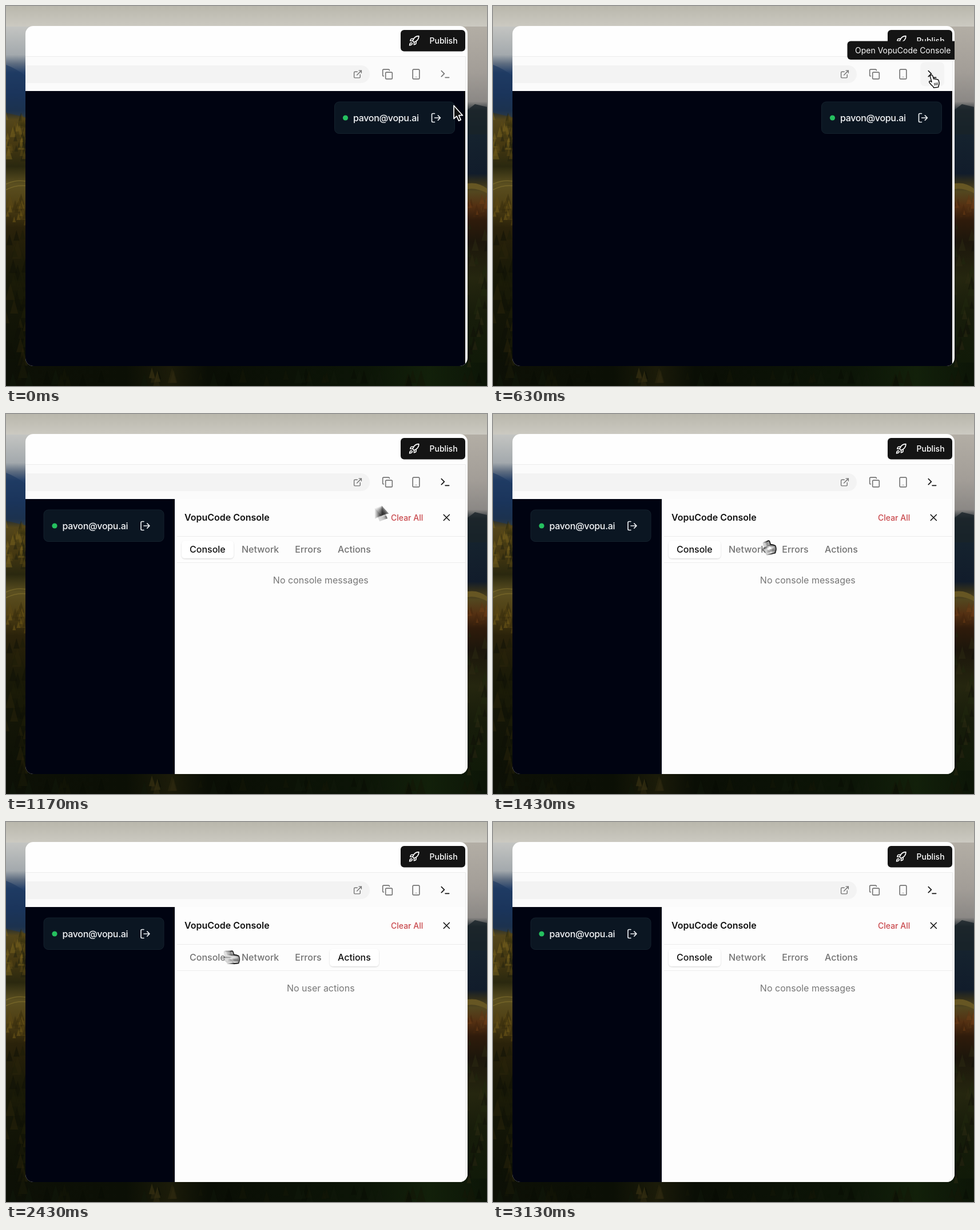
These frames come from a looping animation (841 by 666 pixels, 3160 ms). An HTML page:

```html
<!DOCTYPE html>
<html lang="en">
<head>
<meta charset="utf-8">
<title>Console panel</title>
<style>
  html, body { margin: 0; width: 100%; height: 100%; overflow: hidden; background: #0b1006; }
  svg { display: block; }
  text { font-family: Inter, "Liberation Sans", sans-serif; font-size: 16px; }
  .small { font-size: 14px; }
  .medium { font-weight: 500; }
  .bold { font-weight: 600; }
  .email { font-weight: 500; letter-spacing: -.02em; }
  .icon { fill: none; stroke: currentColor; stroke-width: 2; stroke-linecap: round; stroke-linejoin: round; }
  .line { fill: none; stroke: #ececec; stroke-width: 1; }
</style>
</head>
<body>
<svg width="841" height="666" viewBox="0 0 841 666">
  <defs>
    <linearGradient id="sky" x1="0" x2="0" y1="0" y2="1">
      <stop offset="0" stop-color="#b9b7ac"/><stop offset="1" stop-color="#cbc9c1"/>
    </linearGradient>
    <linearGradient id="leftLand" gradientUnits="userSpaceOnUse" x1="0" x2="0" y1="35" y2="666">
      <stop offset="0" stop-color="#c4c5c2"/><stop offset=".08" stop-color="#a3a9ad"/>
      <stop offset=".105" stop-color="#5d6c80"/><stop offset=".13" stop-color="#25416a"/>
      <stop offset=".19" stop-color="#1a3055"/><stop offset=".235" stop-color="#1d2a36"/>
      <stop offset=".26" stop-color="#54461a"/><stop offset=".33" stop-color="#453811"/>
      <stop offset=".39" stop-color="#2a280f"/><stop offset=".44" stop-color="#5b4f20"/>
      <stop offset=".5" stop-color="#4d3e13"/><stop offset=".56" stop-color="#2a220a"/>
      <stop offset=".7" stop-color="#171807"/><stop offset="1" stop-color="#0a0e05"/>
    </linearGradient>
    <linearGradient id="rightLand" gradientUnits="userSpaceOnUse" x1="0" x2="0" y1="35" y2="666">
      <stop offset="0" stop-color="#b3aea5"/><stop offset=".13" stop-color="#a29d97"/>
      <stop offset=".21" stop-color="#8b8885"/><stop offset=".235" stop-color="#283036"/>
      <stop offset=".28" stop-color="#16242f"/><stop offset=".41" stop-color="#111c2b"/>
      <stop offset=".435" stop-color="#332f1b"/><stop offset=".46" stop-color="#53471f"/>
      <stop offset=".5" stop-color="#543012"/><stop offset=".54" stop-color="#2f1b0b"/>
      <stop offset=".6" stop-color="#1c160b"/><stop offset=".7" stop-color="#25260f"/>
      <stop offset=".8" stop-color="#171c0a"/><stop offset="1" stop-color="#0d1907"/>
    </linearGradient>
    <linearGradient id="ground" x1="0" x2="1" y1="0" y2="0">
      <stop offset="0" stop-color="#0d1006"/><stop offset=".25" stop-color="#0b0f05"/>
      <stop offset=".34" stop-color="#1b1b09"/><stop offset=".42" stop-color="#0a0e05"/>
      <stop offset=".75" stop-color="#0c1507"/><stop offset=".88" stop-color="#12200a"/>
      <stop offset="1" stop-color="#0c1507"/>
    </linearGradient>
    <clipPath id="frame"><rect x="34" y="35" width="773" height="596" rx="14"/></clipPath>
    <filter id="lift" x="-10%" y="-20%" width="120%" height="150%">
      <feDropShadow dx="0" dy="1" stdDeviation="1" flood-opacity=".16"/>
    </filter>
    <g id="arrow">
      <path d="M0 0V23L5 18.6 8.6 26.6 12.2 25 8.7 17.2H15.4Z" fill="#101010" stroke="#fff" stroke-width="1.7" stroke-linejoin="round"/>
    </g>
    <g id="hand" transform="translate(-4.5 -.7)">
      <path d="M5 .8C6.2 .4 7.4 1 7.8 2.2L9.6 7.6C10.3 6.9 11.8 7 12.4 8 13.3 7.3 14.8 7.6 15.3 8.7 16.6 8.2 17.8 9 18.2 10.4L19 14.2C19.4 17 18.4 18.4 18 20L17.6 22 9.4 23 8.6 21C7 19.6 4.8 17.6 2.4 14.4 1 12.6 1.8 11 3.4 11.2 4.4 11.3 5.2 12 6 12.8L3.4 3.4C3 2 3.8 1.2 5 .8Z" fill="#fff" stroke="#111" stroke-width="1.5" stroke-linejoin="round"/>
      <path d="M10.6 14.6l.8 4.4M13.1 14.2l.7 4.5M15.6 13.8l.6 4.5" stroke="#111" stroke-width="1.1" fill="none"/>
    </g>
  </defs>

  <g id="landscape">
    <rect y="35" width="420" height="631" fill="url(#leftLand)"/>
    <rect x="420" y="35" width="421" height="631" fill="url(#rightLand)"/>
    <rect width="841" height="36" fill="url(#sky)"/>
    <path d="M0 103Q18 110 34 122V195L0 187Z" fill="#1b3760" opacity=".6"/>
    <path d="M807 182L820 172 841 177V225H807Z" fill="#1a2428" opacity=".8"/>
    <rect y="625" width="841" height="41" fill="url(#ground)"/>
    <g id="trees"></g>
    <path d="M0 312Q17 304 34 307M0 322Q18 313 34 315" stroke="#86742f" stroke-width="1.5" fill="none" opacity=".6"/>
    <path d="M807 311Q826 308 841 320V328Q822 318 807 321Z" fill="#665623"/>
  </g>

  <g clip-path="url(#frame)">
    <rect x="34" y="35" width="773" height="596" fill="#fefefe"/>
    <rect x="34" y="89" width="769" height="60" fill="#fbfbfb"/>
    <path class="line" d="M34 88.5H803.5V149"/>
    <path d="M34 104H620.5a15.5 15.5 0 0 1 0 31H34Z" fill="#f3f3f3"/>
    <rect x="690" y="42" width="113" height="37.5" rx="6" fill="#141414"/>
    <g id="rocket" color="#fff"></g>
    <text class="small medium" x="740.5" y="66" fill="#fff">Publish</text>
    <g id="tools" color="#757575"></g>
    <rect id="hover" x="747.5" y="98.5" width="41.5" height="42" rx="7" fill="#f4f4f4"/>
    <g id="terminal"></g>

    <rect id="stage" x="34" y="149" width="769" height="482" fill="#000311"/>
    <g id="card">
      <rect x="574.5" y="168" width="210" height="55.5" rx="8" fill="#0b1622" stroke="#14212d"/>
      <circle cx="593.5" cy="196" r="4.6" fill="#25c05f"/>
      <text class="email" x="607" y="201.7" fill="#f4f6f8">pavon@vopu.ai</text>
      <g id="logout" color="#eceff2"></g>
    </g>

    <g id="panel">
      <rect x="295" y="149" width="512" height="482" fill="#fdfdfd"/>
      <path class="line" d="M295.5 149V631M299 214.5H803M299 260.5H803M803.5 149V631"/>
      <text class="bold" x="312" y="187" fill="#111">VopuCode Console</text>
      <text class="small medium" x="673" y="186.5" fill="#c9484c">Clear All</text>
      <g id="close" color="#111"></g>
      <rect id="pill" y="222" height="31" rx="6" fill="#fff" filter="url(#lift)"/>
      <g id="tabs"></g>
      <text id="message" x="550.3" y="296.6" text-anchor="middle" fill="#777"></text>
    </g>

    <g id="tooltip">
      <rect x="619.5" y="61.5" width="200" height="32.5" rx="6" fill="#141414"/>
      <text class="small" x="633" y="82.6" fill="#fafafa">Open VopuCode Console</text>
    </g>
  </g>
  <g id="cursor"></g>
</svg>

<script>
const LOOP = 3160;
const OPEN_AT = 770;
const PANEL_SHIFT = 508.5;
const $ = id => document.getElementById(id);
const set = (el, attrs) => { for (const k in attrs) el.setAttribute(k, attrs[k]); };
const clamp = v => Math.max(0, Math.min(1, v));
const ramp = (t, from, to) => clamp((t - from) / (to - from));
const show = (id, on) => set($(id), { visibility: on ? 'visible' : 'hidden' });

// Icons are drawn on a 24 unit grid around their centre.
const icon = (id, cx, cy, size, body) => {
  const s = size / 24;
  $(id).innerHTML += `<g class="icon" transform="translate(${cx} ${cy}) scale(${s}) translate(-12 -12)">${body}</g>`;
};
const path = d => `<path d="${d}"/>`;

icon('rocket', 713.5, 61, 20, path('M4.5 16.5c-1.5 1.26-2 5-2 5s3.74-.5 5-2c.71-.84.7-2.13-.09-2.91a2.18 2.18 0 0 0-2.91-.09z') +
  path('m12 15-3-3a22 22 0 0 1 2-3.95A12.88 12.88 0 0 1 22 2c0 2.72-.78 7.5-6 11a22.35 22.35 0 0 1-4 2z') +
  path('M9 12H4s.55-3.03 2-4c1.62-1.08 5 0 5 0M12 15v5s3.03-.55 4-2c1.08-1.62 0-5 0-5'));
icon('tools', 615, 119.5, 17, path('M15 3h6v6M10 14 21 3M18 13v6a2 2 0 0 1-2 2H5a2 2 0 0 1-2-2V8a2 2 0 0 1 2-2h6'));
icon('tools', 667, 119.5, 20, '<rect x="8" y="8" width="14" height="14" rx="2"/>' +
  path('M4 16c-1.1 0-2-.9-2-2V4c0-1.1.9-2 2-2h10c1.1 0 2 .9 2 2'));
icon('tools', 717, 119.5, 20, '<rect x="5" y="2" width="14" height="20" rx="2"/>' + path('M12 18h.01'));
icon('terminal', 768, 119.5, 20, path('m4 17 6-6-6-6M12 19h8'));
icon('logout', 752, 196, 20, path('M9 21H5a2 2 0 0 1-2-2V5a2 2 0 0 1 2-2h4m7 14 5-5-5-5M21 12H9'));
icon('close', 770.3, 181.5, 20, path('M18 6 6 18M6 6l12 12'));

// Woodland around the window.
let seed = 7;
const random = () => (seed = seed * 16807 % 2147483647) / 2147483647;
function grow(count, x, y, w, h, size, colors) {
  let out = '';
  for (let i = 0; i < count; i++) {
    const cx = x + random() * w, top = y + h * (i + random()) / count;
    const tall = size * (.6 + random() * .8), half = tall * .28;
    const color = colors[Math.floor(random() * colors.length)];
    out += `<path d="M${cx} ${top}l${half} ${tall}h${-2 * half}z" fill="${color}" opacity=".5"/>`;
  }
  $('trees').innerHTML += out;
}
grow(40, 0, 184, 36, 70, 17, ['#7a631d', '#383110', '#5b4916', '#1f200d']);
grow(18, 0, 328, 36, 42, 16, ['#765d1a', '#33290c', '#5b4814']);
grow(34, 0, 385, 36, 240, 24, ['#2a240a', '#0d1005', '#1b1c08']);
grow(14, 806, 328, 36, 34, 13, ['#6f3e15', '#43260e', '#553516']);
grow(26, 806, 380, 36, 240, 18, ['#2c2911', '#100f07', '#20270e']);
grow(40, 0, 634, 841, 12, 22, ['#131606', '#080b04', '#0f1709']);
grow(7, 252, 632, 46, 14, 20, ['#443a16', '#2f2a0f']);

const TABS = [
  { name: 'Console', x: 321, w: 63, empty: 'No console messages' },
  { name: 'Network', x: 412, w: 65, empty: 'No network requests' },
  { name: 'Errors', x: 505.3, w: 47, empty: 'No runtime errors' },
  { name: 'Actions', x: 580, w: 58, empty: 'No user actions' }
];
$('tabs').innerHTML = TABS.map(b => `<text class="medium" x="${b.x}" y="242.8">${b.name}</text>`).join('');
const labels = [...$('tabs').children];
const CLICKS = [[0, 0], [1590, 1], [1800, 2], [2100, 3], [2570, 0]];

// Cursor moves: start, end, target x, target y.
const START = [783, 174.5];
const MOVES = [
  [30, 420, 765.5, 121], [700, 800, 764.5, 119], [900, 1560, 448, 234],
  [1620, 1790, 512.5, 228], [1890, 2090, 600, 227], [2130, 2534, 350, 226]
];
function cursorAt(t) {
  let [x, y] = START;
  for (const [from, to, tx, ty] of MOVES) {
    const p = (1 - Math.cos(Math.PI * ramp(t, from, to))) / 2;
    x += (tx - x) * p;
    y += (ty - y) * p;
  }
  return [x, y];
}

// Stacked copies average into a motion blur.
const COPIES = 7, SHUTTER = 16;
for (let i = 0; i < COPIES; i++) $('cursor').innerHTML += `<use opacity="${1 / (i + 1)}"/>`;
const copies = [...$('cursor').children];

function drawCursor(t, shape) {
  const moving = Math.hypot(...cursorAt(t + 8).map((v, i) => v - cursorAt(t - 8)[i])) > .6;
  copies.forEach((copy, i) => {
    const [x, y] = cursorAt(t + (moving ? (i / (COPIES - 1) - .5) * SHUTTER : 0));
    set(copy, { href: shape, transform: `translate(${x} ${y})`, visibility: moving || !i ? 'visible' : 'hidden' });
  });
  set($('cursor'), { opacity: 1 - ramp(t, 2850, 3000) });
}

function draw(t) {
  const open = t >= OPEN_AT;
  const [x, y] = cursorAt(t);
  const onTerminal = x > 747 && x < 789 && y > 98 && y < 141;
  const onTabs = open && x > 307 && x < 652 && y > 218 && y < 256;

  show('hover', onTerminal);
  set($('terminal'), { color: onTerminal || open ? '#141414' : '#757575' });
  set($('tooltip'), { opacity: ramp(t, 430, 530) * (1 - ramp(t, 720, 800)) });

  show('panel', open);
  set($('stage'), { width: open ? 261 : 769 });
  set($('card'), { transform: `translate(${open ? -PANEL_SHIFT : 0} 0)` });

  const step = CLICKS.filter(c => c[0] <= t).length - 1;
  const [since, active] = CLICKS[step];
  const previous = step ? CLICKS[step - 1][1] : -1;
  const faded = Math.round(16 + 99 * ramp(t, since, since + 150));
  labels.forEach((label, i) => {
    const v = i === active ? 16 : i === previous ? faded : 115;
    set(label, { fill: `rgb(${v},${v},${v})` });
  });
  const tab = TABS[active];
  set($('pill'), { x: tab.x - 14, width: tab.w + 28 });
  $('message').textContent = tab.empty;

  drawCursor(t, onTerminal || onTabs ? '#hand' : '#arrow');
}

const begin = performance.now();
function tick() {
  draw((performance.now() - begin) % LOOP);
  requestAnimationFrame(tick);
}
tick();
</script>
</body>
</html>
```
